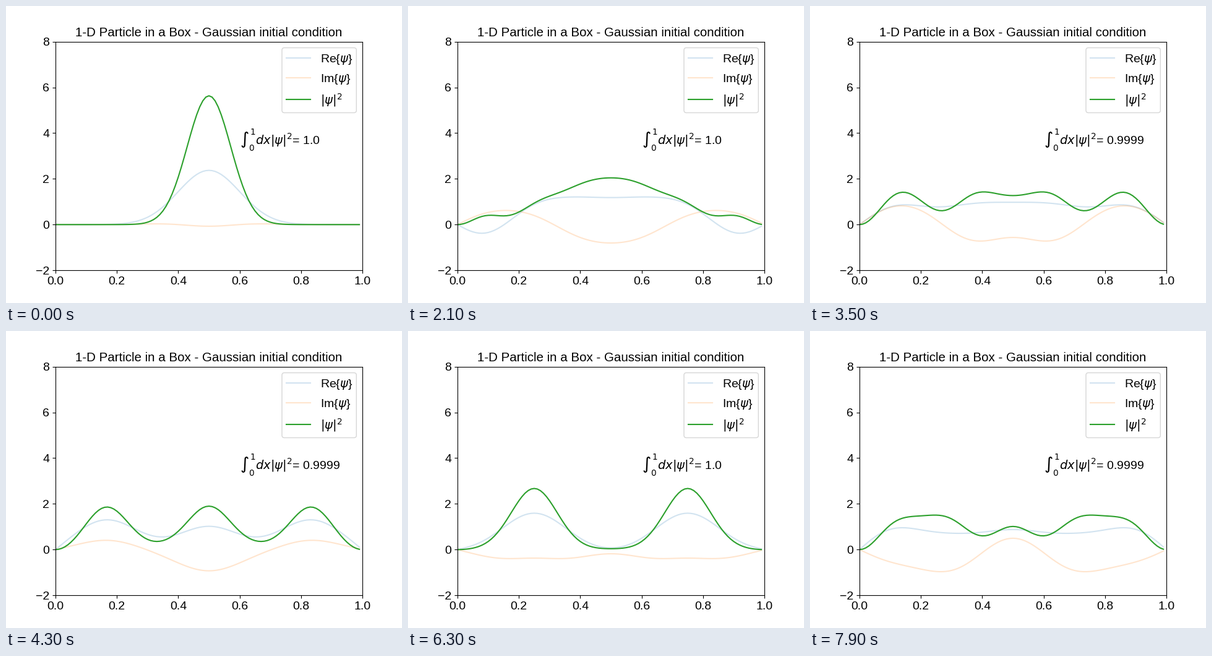
Recreate the animation shown at these times as a matplotlib script. Size 640 px wide and 480 px high, loop 8 s.

```python
import numpy as np
import matplotlib.pyplot as plt
from matplotlib.animation import FuncAnimation
from matplotlib.lines import Line2D
from matplotlib.patches import FancyBboxPatch
from matplotlib.transforms import IdentityTransform

plt.rcParams.update({
    "font.family": "Liberation Sans",
    "font.size": 14,
    "mathtext.fontset": "dejavusans",
})

W, H, DPI = 640, 480, 100
FRAMES, INTERVAL = 80, 100
T0, DT = 0.0006, 0.0012
DX, SIGMA = 0.01, 0.1

# Gaussian packet expanded in the odd eigenmodes of the box (hbar = m = 1)
x = np.arange(100) * DX
n = np.arange(1, 24, 2)
k = n * np.pi
coef = np.exp(-(k * SIGMA) ** 2 / 2)
coef *= np.sin(k / 2) / np.sqrt(np.sum(coef ** 2))
modes = np.sqrt(2) * np.sin(np.outer(x, k))
energy = k ** 2 / 2


def wave(t):
    return modes @ (coef * np.exp(-1j * energy * t))


def total(prob):
    """Trapezoid rule over the sampled points, as a rounded label."""
    area = DX * (prob.sum() - (prob[0] + prob[-1]) / 2)
    return str(round(float(area) + 1e-6, 4))


fig = plt.figure(figsize=(W / DPI, H / DPI), dpi=DPI)
ax = fig.add_axes([0.125, 0.11, 0.775, 0.77])
ax.set(xlim=(0, 1), ylim=(-2, 8))
ax.set_xticks(np.arange(6) / 5)
ax.set_yticks(range(-2, 9, 2))
ax.set_title("1-D Particle in a Box - Gaussian initial condition", fontsize=14.75)

styles = [
    dict(color="C0", alpha=0.2, lw=1.5),
    dict(color="C1", alpha=0.2, lw=1.5),
    dict(color="C2", lw=1.5),
]
curves = [ax.plot(x, 0 * x, **s)[0] for s in styles]
label = ax.text(0.6, 3.5, "")

# Legend, laid out in pixels
px = IdentityTransform()
ax.add_artist(FancyBboxPatch(
    (446, H - 172.5), 120.3, 105, boxstyle="round,pad=0,rounding_size=3.9",
    fc="white", ec="0.8", lw=1, alpha=0.8, transform=px, zorder=5))
entries = [(r"Re{$\psi$}", 84, 91), (r"Im{$\psi$}", 116, 123), (r"$|\psi|^2$", 151, 158)]
for (name, y, base), style in zip(entries, styles):
    ax.add_artist(Line2D([453, 492], [H - y] * 2, transform=px, zorder=6, **style))
    ax.text(508.3, H - base, name, transform=px, zorder=6)


def update(i):
    psi = wave(T0 + DT * i)
    prob = np.abs(psi) ** 2
    for curve, y in zip(curves, (psi.real, psi.imag, prob)):
        curve.set_ydata(y)
    label.set_text(r"$\int_0^1 dx|\psi|^2$= " + total(prob))
    return [*curves, label]


anim = FuncAnimation(fig, update, frames=FRAMES, interval=INTERVAL,
                     repeat=True, repeat_delay=0, blit=False)
plt.show()
```
